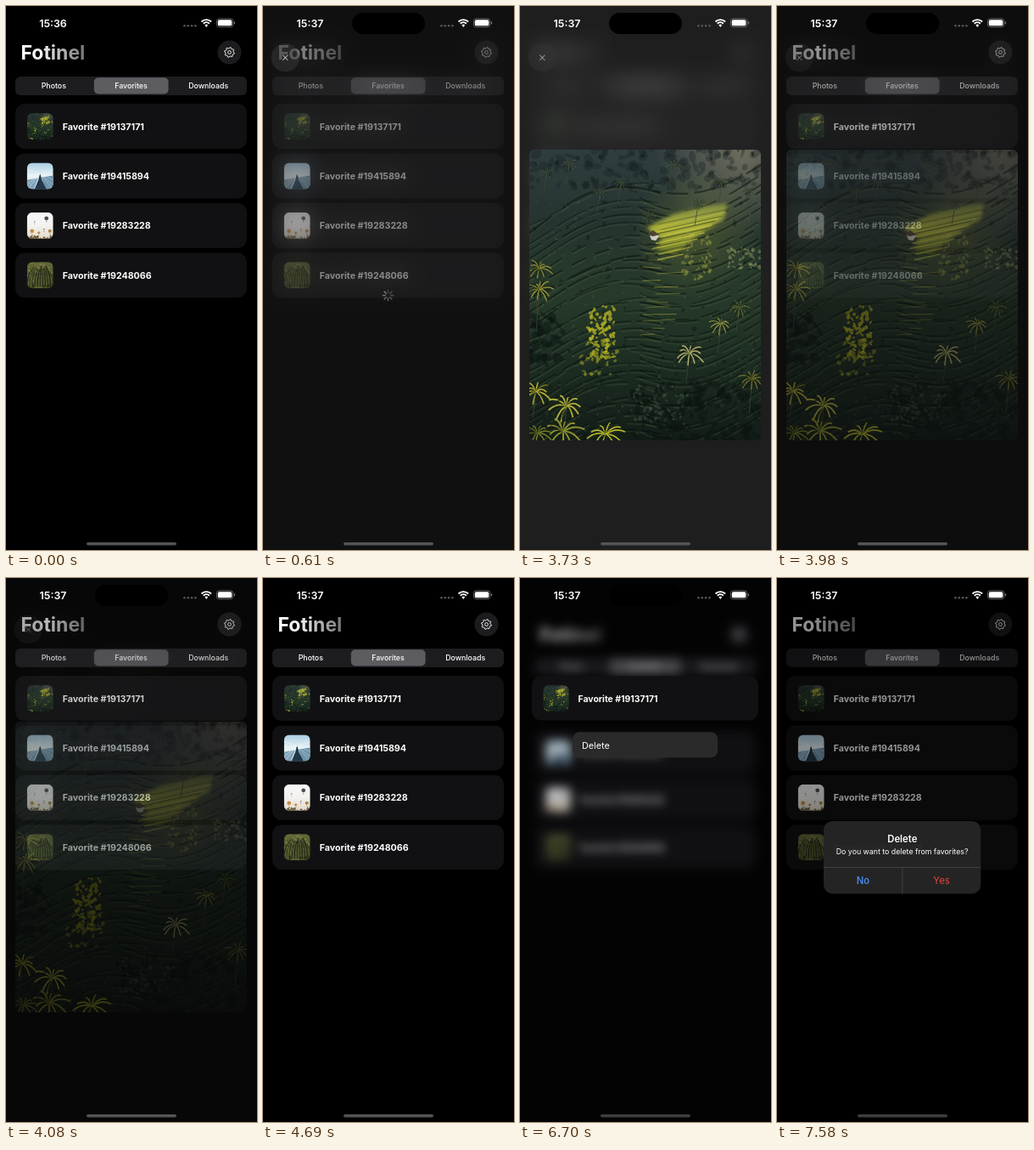
Recreate the animation shown at these times as an HTML page with a canvas. Size 296x640 px, loop 8000 ms.

```html
<!DOCTYPE html>
<html lang="en">
<head>
<meta charset="utf-8">
<title>Favorites</title>
<style>
html, body { margin: 0; width: 100%; height: 100%; overflow: hidden; background: #000; }
canvas { display: block; width: 296px; height: 640px; }
</style>
</head>
<body>
<canvas id="stage"></canvas>
<script>
const W = 296, H = 640, LOOP = 8000;
const dpr = window.devicePixelRatio || 1;
const TAU = Math.PI * 2;

// Bursts of motion: start, end, number of pictures.
const BURSTS = [[500, 1210, 8], [3730, 4500, 8], [5160, 5930, 8],
  [6030, 6250, 3], [6480, 6700, 3], [7030, 7580, 6]];
const ROWS = ['19137171', '19415894', '19283228', '19248066'];
const ROW_STEP = 58.4;

const clamp = x => Math.min(1, Math.max(0, x));
const ramp = (t, a, b) => clamp((t - a) / (b - a));
const easeOut = x => 1 - (1 - x) ** 3;
const smooth = x => x * x * (3 - 2 * x);

function snap(t) {
  let held = 0;
  for (const [a, b, n] of BURSTS) {
    const step = (b - a) / (n - 1);
    if (t >= b) held = b;
    else if (t >= a) held = a + Math.floor((t - a) / step) * step;
  }
  return held;
}

function seeded(seed) {
  return () => (seed = (seed * 16807) % 2147483647) / 2147483647;
}

function makeLayer(draw, w = W, h = H) {
  const c = document.createElement('canvas');
  c.width = Math.round(w * dpr);
  c.height = Math.round(h * dpr);
  const g = c.getContext('2d');
  g.scale(dpr, dpr);
  draw(g);
  return c;
}

function box(g, x, y, w, h, r, fill) {
  g.beginPath();
  g.roundRect(x, y, w, h, r);
  g.fillStyle = fill;
  g.fill();
}

function disc(g, x, y, r, fill) {
  g.beginPath();
  g.arc(x, y, r, 0, TAU);
  g.fillStyle = fill;
  g.fill();
}

function poly(g, fill, ...pts) {
  g.beginPath();
  pts.forEach(([x, y]) => g.lineTo(x, y));
  g.fillStyle = fill;
  g.fill();
}

function glow(g, x, y, r, rgb, alpha) {
  const grad = g.createRadialGradient(x, y, 0, x, y, r);
  grad.addColorStop(0, `rgba(${rgb},${alpha})`);
  grad.addColorStop(1, `rgba(${rgb},0)`);
  g.fillStyle = grad;
  g.fillRect(x - r, y - r, 2 * r, 2 * r);
}

function shade(g, y0, y1, ...colors) {
  const grad = g.createLinearGradient(0, y0, 0, y1);
  colors.forEach((c, i) => grad.addColorStop(i / (colors.length - 1), c));
  return grad;
}

// y is the middle of the capitals.
function label(g, str, x, y, size, weight, fill, align = 'left') {
  g.font = `${weight} ${size}px Inter, sans-serif`;
  g.textAlign = align;
  g.textBaseline = 'alphabetic';
  g.fillStyle = fill;
  g.fillText(str, x, y + size * 0.364);
}

function line(g, color, width, x0, y0, x1, y1) {
  g.strokeStyle = color;
  g.lineWidth = width;
  g.beginPath();
  g.moveTo(x0, y0);
  g.lineTo(x1, y1);
  g.stroke();
}

function withAlpha(g, alpha, draw) {
  if (alpha <= 0) return;
  g.save();
  g.globalAlpha *= alpha;
  draw();
  g.restore();
}

function scaled(g, s, cx, cy, draw) {
  g.save();
  g.translate(cx, cy);
  g.scale(s, s);
  g.translate(-cx, -cy);
  draw();
  g.restore();
}

/* ---------- pictures ---------- */

function palm(g, rnd, x, y, r, color, trunk = 0) {
  if (trunk) line(g, 'rgba(64,68,50,.8)', 1, x, y, x - 4, y + trunk);
  for (let i = 0; i < 20; i++) {
    const a = i / 20 * TAU + rnd() * 0.3, len = r * (0.6 + rnd() * 0.5);
    const ex = x + Math.cos(a) * len, ey = y + Math.sin(a) * len * 0.8;
    g.strokeStyle = i % 2 ? color : 'rgba(24,36,18,.75)';
    g.lineWidth = r / 13;
    g.beginPath();
    g.moveTo(x, y);
    g.quadraticCurveTo((x + ex) / 2, (y + ey) / 2 - r * 0.25, ex, ey + r * 0.12);
    g.stroke();
  }
}

function leaves(g, rnd, n, x, y, w, h, size, color) {
  g.fillStyle = color;
  for (let i = 0; i < n; i++) {
    g.beginPath();
    g.ellipse(x + rnd() * w, y + rnd() * h, size * (0.4 + rnd()), size * (0.3 + rnd() * 0.6), rnd() * 3, 0, TAU);
    g.fill();
  }
}

// Broken contour lines on both sides of a ridge.
function contours(g, rnd) {
  const curve = (color, width, ...p) => {
    g.strokeStyle = color;
    g.lineWidth = width;
    g.beginPath();
    g.moveTo(p[0], p[1]);
    g.bezierCurveTo(...p.slice(2));
    g.stroke();
  };
  for (let i = 0; i < 30; i++) {
    const y = 45 + i * 10 + rnd() * 5, bend = 10 + rnd() * 22;
    g.setLineDash([18 + rnd() * 40, 3 + rnd() * 14]);
    for (const [dy, color] of [[0, 'rgba(9,18,15,.5)'], [2.5, 'rgba(88,105,68,.22)']]) {
      curve(color, 1 + rnd() * 1.4, -5, y + 45 + dy, 40, y + 45 - bend + dy, 75, y - bend + dy, 155, y - 5 + dy);
      curve(color, 1 + rnd() * 1.4, 130, y + dy, 185, y + bend + dy, 215, y + 10 + dy, 278, y - 30 + dy);
    }
  }
  g.setLineDash([]);
}

function drawSlope(g, rnd) {
  g.filter = `blur(${2 * dpr}px)`;
  poly(g, shade(g, 62, 128, '#7d8a45', '#aeb139', '#5e6c28'),
    [138, 92], [170, 76], [205, 67], [234, 63], [229, 82], [202, 98], [172, 123], [150, 118], [156, 105]);
  g.filter = 'none';
  for (let i = 0; i < 14; i++) {
    const y = 88 + i * 3.2, x = 142 + rnd() * 14;
    const right = 236 - i * 4.2;
    line(g, i % 2 ? 'rgba(206,204,72,.6)' : 'rgba(48,66,25,.6)', 0.8 + rnd(), x, y, right, y - (right - x) * 0.22);
  }
  for (let i = 0; i < 13; i++) {
    const y = 122 + i * 8, x = 130 + rnd() * 22;
    line(g, `rgba(178,178,60,${0.3 + rnd() * 0.3})`, 1.2, x, y, x + 14 + rnd() * 26, y - 3 + rnd() * 5);
  }
  poly(g, '#cfccc4', [142, 101], [148, 98], [153, 102], [149, 107], [144, 106]);
  poly(g, '#4f4130', [139, 100], [146, 95], [153, 100], [146, 102]);
}

function drawTerraces(g) {
  const rnd = seeded(77);
  g.fillStyle = shade(g, 0, 342, '#303d40', '#25342f', '#273a2a', '#1c2c22', '#121c17');
  g.fillRect(0, 0, 273, 342);
  glow(g, 250, 5, 100, '168,155,122', 0.5);
  glow(g, 195, 98, 75, '140,145,55', 0.35);
  contours(g, rnd);
  leaves(g, rnd, 130, 0, -5, 273, 50, 6, 'rgba(22,32,32,.32)');
  leaves(g, rnd, 110, 0, 0, 273, 342, 3, 'rgba(12,22,18,.4)');
  leaves(g, rnd, 130, 0, 60, 273, 282, 1.6, 'rgba(100,116,75,.28)');
  leaves(g, rnd, 100, 120, 275, 155, 70, 6, 'rgba(10,19,16,.45)');
  leaves(g, rnd, 60, 122, 278, 65, 45, 2.2, 'rgba(64,85,66,.5)');
  leaves(g, rnd, 40, -5, 195, 45, 60, 6, 'rgba(12,22,17,.5)');
  drawSlope(g, rnd);
  leaves(g, rnd, 60, 180, 98, 34, 55, 2.2, 'rgba(136,144,60,.6)');
  leaves(g, rnd, 40, 234, 115, 38, 25, 2.4, 'rgba(128,138,88,.55)');
  leaves(g, rnd, 70, 70, 184, 30, 62, 2.8, 'rgba(184,182,38,.75)');
  leaves(g, rnd, 45, 60, 225, 44, 40, 2.4, 'rgba(130,138,32,.7)');
  for (let i = 0; i < 9; i++) {
    palm(g, rnd, 14 + i * 30 + rnd() * 10, 14 + rnd() * 65, 9, 'rgba(84,98,78,.75)', 24);
  }
  palm(g, rnd, 189, 240, 20, '#b0ad70', 32);
  palm(g, rnd, 226, 205, 14, '#989848', 34);
  palm(g, rnd, 248, 186, 13, '#66733b', 28);
  palm(g, rnd, 12, 140, 16, '#8c8b38', 50);
  palm(g, rnd, 12, 165, 17, '#9a973a', 50);
  palm(g, rnd, 8, 285, 20, '#b9af35', 30);
  palm(g, rnd, 44, 302, 24, '#b2b03e', 40);
  palm(g, rnd, 90, 335, 22, '#b5b530', 0);
  palm(g, rnd, 40, 332, 25, '#8f9330', 0);
  palm(g, rnd, 10, 334, 18, '#777d29', 0);
  palm(g, rnd, 263, 270, 16, '#77742f', 40);
}

const terraces = makeLayer(drawTerraces, 273, 342);

// Each thumbnail paints a 31 by 31 square.
const THUMBS = [
  g => {
    g.drawImage(terraces, 0, 34 * dpr, 273 * dpr, 273 * dpr, 0, 0, 31, 31);
    leaves(g, seeded(9), 9, 16, 6, 10, 7, 1.3, '#a7a42a');
  },
  g => {
    g.fillStyle = shade(g, 0, 31, '#a9cde2', '#e9f3f6', '#d4e2e9');
    g.fillRect(0, 0, 31, 31);
    poly(g, '#7fa2b8', [0, 20], [13, 18], [8, 31], [0, 31]);
    poly(g, '#6f94ac', [31, 15], [17, 17], [22, 31], [31, 31]);
    poly(g, '#22384a', [15.5, 12], [17.5, 20], [23, 31], [9, 31], [13.5, 20]);
    for (let i = 0; i < 5; i++) {
      line(g, 'rgba(236,246,250,.7)', 0.7, 15.5, 13, 0, 8 + i * 6);
      line(g, 'rgba(236,246,250,.5)', 0.7, 15.5, 13, 31, 8 + i * 6);
    }
  },
  g => {
    g.fillStyle = shade(g, 0, 31, '#f7f7f8', '#f3f2f0', '#e2d9c8');
    g.fillRect(0, 0, 31, 31);
    leaves(g, seeded(31), 16, 0, 28, 31, 4, 2, '#6a5a3c');
    for (const [x, y, r, c] of [[23, 7, 2.4, '#4b4c50'], [9, 11, 0.9, '#999'], [6, 22, 2.3, '#c58a3f'], [14, 24, 1.6, '#b98f55'], [27, 22, 2, '#a98343'], [20, 20, 0.8, '#666']]) {
      disc(g, x, y, r, c);
      g.fillRect(x - 0.5, y + r + 1, 1, 1);
    }
  },
  g => {
    const rnd = seeded(5);
    g.fillStyle = shade(g, 0, 31, '#666a38', '#4a5029', '#5a6030');
    g.fillRect(0, 0, 31, 31);
    leaves(g, rnd, 60, 0, 0, 31, 24, 1.4, 'rgba(140,140,82,.55)');
    g.strokeStyle = '#262a1a';
    for (let i = 0; i < 11; i++) {
      const x = i * 3.1, lean = (15.5 - x) * 0.5;
      g.lineWidth = 0.6 + rnd();
      g.beginPath();
      g.moveTo(x, 29);
      g.quadraticCurveTo(x, 14, x + lean + rnd() * 4 - 2, 4 + rnd() * 6);
      g.stroke();
    }
    leaves(g, rnd, 14, 0, 26, 31, 5, 2, 'rgba(40,45,22,.7)');
  }
];

/* ---------- list screen ---------- */

function drawRow(g, i) {
  const top = 115 + i * ROW_STEP;
  box(g, 11, top, 273, 53, 11, '#111113');
  g.save();
  g.translate(24.7, top + 11);
  g.beginPath();
  g.roundRect(0, 0, 31, 31, 6.5);
  g.clip();
  THUMBS[i](g);
  g.restore();
  label(g, 'Favorite #' + ROWS[i], 66.8, top + 26.8, 10.65, 700, '#fff');
}

function drawGear(g, x, y) {
  disc(g, x, y, 14, '#1c1c1e');
  g.strokeStyle = '#f0f0f0';
  g.lineWidth = 1;
  g.lineJoin = 'round';
  g.beginPath();
  for (let i = 0; i < 32; i++) {
    const a = (i + 0.5) / 32 * TAU, r = i % 4 < 2 ? 5.9 : 4.6;
    g.lineTo(x + Math.cos(a) * r, y + Math.sin(a) * r);
  }
  g.closePath();
  g.stroke();
  g.beginPath();
  g.arc(x, y, 1.9, 0, TAU);
  g.stroke();
}

function drawList(g, firstRow) {
  g.fillStyle = '#000';
  g.fillRect(0, 0, W, H);
  const fade = g.createLinearGradient(18, 0, 95, 0);
  fade.addColorStop(0, '#fff');
  fade.addColorStop(0.3, '#f4f4f4');
  fade.addColorStop(1, '#707070');
  label(g, 'Fotinel', 17.5, 55, 23, 700, fade);
  drawGear(g, 263.5, 54.5);
  box(g, 11, 83, 273, 22, 6, '#1d1d20');
  box(g, 103.8, 84.3, 87.8, 19.2, 5, '#5c5c61');
  ['Photos', 'Favorites', 'Downloads'].forEach((name, i) =>
    label(g, name, 56.3 + i * 91.2, 94, 8.8, 500, '#fff', 'center'));
  for (let i = firstRow; i < ROWS.length; i++) drawRow(g, i);
}

const list = makeLayer(g => drawList(g, 0));
const listRest = makeLayer(g => drawList(g, 1));
const frosted = makeLayer(g => {
  g.fillStyle = '#000';
  g.fillRect(0, 0, W, H);
  g.filter = `blur(${13 * dpr}px)`;
  g.drawImage(list, 0, 0, W, H);
  g.filter = 'none';
  g.fillStyle = 'rgba(49,49,49,.62)';
  g.fillRect(0, 0, W, H);
});

/* ---------- overlays ---------- */

function drawStatus(g, time, barColor) {
  box(g, 105, 8, 86, 25, 12.5, '#000');
  label(g, time, 55.5, 20, 12.4, 600, '#fff', 'center');
  for (let i = 0; i < 4; i++) disc(g, 210.5 + i * 4.3, 23.3, 1.3, '#58585a');
  g.strokeStyle = '#fff';
  g.lineWidth = 1.9;
  for (const r of [8.2, 5]) {
    g.beginPath();
    g.arc(236.3, 24.3, r, -Math.PI * 0.75, -Math.PI * 0.25);
    g.stroke();
  }
  g.beginPath();
  g.moveTo(236.3, 25);
  g.arc(236.3, 24.3, 2.6, -Math.PI * 0.75, -Math.PI * 0.25);
  g.fillStyle = '#fff';
  g.fill();
  g.lineWidth = 0.8;
  g.strokeStyle = '#777';
  g.beginPath();
  g.roundRect(248.4, 14.9, 19.4, 9.8, 3);
  g.stroke();
  box(g, 249.8, 16.3, 16.6, 7, 1.9, '#fff');
  box(g, 268.9, 18.2, 1.2, 3.2, 0.6, '#777');
  box(g, 95, 631, 106, 3.6, 1.8, barColor);
}

function drawSpinner(g) {
  g.lineCap = 'round';
  for (let i = 0; i < 8; i++) {
    const a = i / 8 * TAU, c = Math.cos(a), s = Math.sin(a);
    const v = 95 + ((i + 2) % 8) * 14;
    line(g, `rgb(${v},${v},${v})`, 1.5, 147.5 + c * 3.1, 340.5 + s * 3.1, 147.5 + c * 6.2, 340.5 + s * 6.2);
  }
  g.lineCap = 'butt';
}

function drawClose(g) {
  disc(g, 26.3, 60.7, 16.6, '#353535');
  line(g, '#fff', 1.2, 23.2, 57.6, 29.4, 63.8);
  line(g, '#fff', 1.2, 29.4, 57.6, 23.2, 63.8);
}

function drawViewer(g, t) {
  const loaded = t >= 3730;
  const stay = 1 - ramp(t, 3740, 4400);
  const alpha = loaded ? stay ** 2.2 : easeOut(ramp(t, 430, 1150));
  withAlpha(g, alpha, () => g.drawImage(frosted, 0, 0, W, H));
  withAlpha(g, loaded ? stay * 0.42 : alpha, () => drawClose(g));
  if (!loaded) {
    withAlpha(g, alpha, () => drawSpinner(g));
    return;
  }
  withAlpha(g, stay ** 1.8, () => {
    g.beginPath();
    g.roundRect(11, 169, 273, 342, 6);
    g.clip();
    g.drawImage(terraces, 11, 169, 273, 342);
  });
}

function drawContext(g, p, menu) {
  g.fillStyle = '#000';
  g.fillRect(0, 0, W, H);
  scaled(g, 1 - 0.045 * p, 148, 320, () => {
    g.filter = `blur(${6 * p * dpr}px)`;
    g.drawImage(listRest, 0, 0, W, H);
    g.filter = 'none';
  });
  g.fillStyle = `rgba(14,14,16,${0.25 * p})`;
  g.fillRect(0, 0, W, H);
  scaled(g, 1 - 0.022 * p, 147.5, 141.5, () => drawRow(g, 0));
  withAlpha(g, menu, () => scaled(g, 0.3 + 0.7 * menu, 147.5, 178, () => {
    box(g, 62, 181.3, 171.3, 30, 8, '#2a2a2b');
    label(g, 'Delete', 73, 196.8, 10.8, 400, '#fff');
  }));
}

function drawAlert(g, p) {
  withAlpha(g, p, () => {
    g.fillStyle = 'rgba(0,0,0,.42)';
    g.fillRect(0, 36, W, 590);
    scaled(g, 1.15 - 0.15 * p, 147.7, 328.7, () => {
      box(g, 55, 286, 185.3, 85.4, 10.5, 'rgba(38,38,39,.97)');
      label(g, 'Delete', 147.8, 306.7, 11.3, 600, '#fff', 'center');
      label(g, 'Do you want to delete from favorites?', 147.6, 321.3, 8.8, 400, '#fff', 'center');
      line(g, '#48484a', 0.8, 55, 340.5, 240.3, 340.5);
      line(g, '#48484a', 0.8, 147.9, 340.5, 147.9, 371.4);
      label(g, 'No', 101.5, 356.3, 11.3, 500, '#4a93f5', 'center');
      label(g, 'Yes', 194, 356.3, 11.3, 400, '#e2463c', 'center');
    });
  });
}

/* ---------- playback ---------- */

const stage = document.getElementById('stage');
stage.width = Math.round(W * dpr);
stage.height = Math.round(H * dpr);
const ctx = stage.getContext('2d');

function render(t) {
  ctx.setTransform(dpr, 0, 0, dpr, 0, 0);
  ctx.drawImage(list, 0, 0, W, H);
  if (t >= 500 && t < 4500) drawViewer(ctx, t);
  const leave = 1 - smooth(ramp(t, 6980, 7380));
  const focus = smooth(ramp(t, 5200, 5880)) * leave;
  const menu = easeOut(ramp(t, 5450, 5920)) * leave;
  if (focus > 0) drawContext(ctx, focus, menu);
  drawAlert(ctx, easeOut(ramp(t, 7180, 7560)));
  const bar = Math.round(84 - 22 * smooth(ramp(t, 5200, 5880)));
  drawStatus(ctx, t < 600 ? '15:36' : '15:37', `rgb(${bar},${bar},${bar})`);
}

let shown = -1;
function tick() {
  const t = snap(performance.now() % LOOP);
  if (t !== shown) render(shown = t);
  requestAnimationFrame(tick);
}
tick();
</script>
</body>
</html>
```
